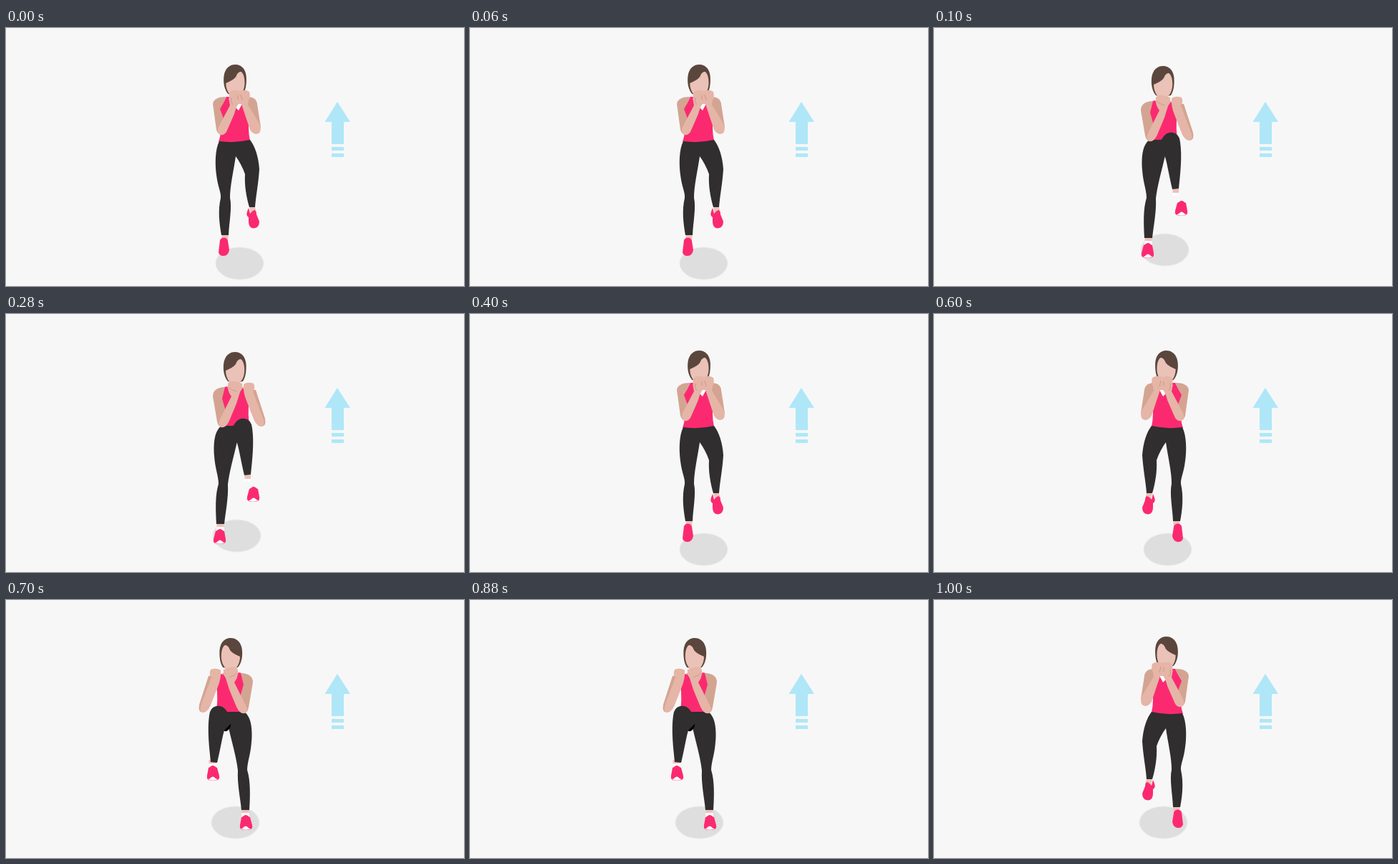
An HTML page for the animation above (1100 ms loop, 640x360 px).

```html
<!DOCTYPE html>
<html lang="en">
<head>
<meta charset="utf-8">
<title>High knees</title>
<style>
  html, body { margin: 0; width: 100%; height: 100%; overflow: hidden; background: #f7f7f7; }
  svg { display: block; width: 100%; height: 100%; }
  .pink { fill: #fb2a70; }
  .pants { fill: #302e2f; }
  .skin { fill: #e5b5a7; }
  .shade { fill: #d4a492; }
  .face { fill: #ebc2b7; }
  .hair { fill: #5b463d; }
  .white { fill: #fff; }
  .arrow { fill: #afe7f8; }
  .line { fill: none; stroke: #c99784; stroke-width: .9; }

  .pose, .shadow { animation: 1.1s step-end infinite; }
  .pose { opacity: 0; }
  .lift-r { animation-name: lift-r; }
  .knee-r { animation-name: knee-r; }
  .stand { animation-name: stand; }
  .lift-l { animation-name: lift-l; }
  .knee-l { animation-name: knee-l; }
  .shadow { fill: #dedede; animation-name: shadow; }

  @keyframes lift-r { 0%, 36.36% { opacity: 1 } 9.09%, 45.45%, 100% { opacity: 0 } }
  @keyframes knee-r { 0%, 36.36%, 100% { opacity: 0 } 9.09% { opacity: 1 } }
  @keyframes stand { 0%, 54.54%, 100% { opacity: 0 } 45.45% { opacity: 1 } }
  @keyframes lift-l { 0%, 63.63% { opacity: 0 } 54.54%, 90.9%, 100% { opacity: 1 } }
  @keyframes knee-l { 0%, 90.9%, 100% { opacity: 0 } 63.63% { opacity: 1 } }
  @keyframes shadow {
    0%, 36.36%, 54.54% { transform: translate(326.5px, 328.5px) }
    9.09%, 45.45% { transform: translate(322.5px, 309.5px) }
    63.63%, 100% { transform: translate(320.5px, 310.5px) }
  }
</style>
</head>
<body>
<svg viewBox="0 0 640 360">
  <defs>
    <g id="head">
      <path class="hair" d="M310 86C303 78 303 64 305 57C308 48 314 45 320 45C329 45 335 52 335.500 62C336 71 335 80 331 86L320 88Z"/>
      <path class="face" d="M307 71C313 68 318 66 321 62C323 57 325 55 328 55C332 57 334 66 333 74C332 84 326 90 320 90C313 90 307 82 307 71Z"/>
    </g>

    <path id="neck" class="shade" d="M313 80H327V91Q330 95 336 96L320 108L304 96Q311 95 313 91Z"/>

    <g id="shoe">
      <path class="face" d="M294.500 292H304.500V302H294.500Z"/>
      <path class="white" d="M294.500 297H304.500L305 303H294Z"/>
      <path class="pink" d="M293 303C295 303 296 300 299 300C302 300 303 303 305 303L307 314Q308 320 303 320.500H294Q289 320 290 314Z"/>
      <path class="white" d="M291 319Q295 319 296 317Q299 314 302 317Q303 319 306 319Q299 322 291 319Z"/>
    </g>

    <path id="leg" class="pants" d="M301 156C290 164 290 184 291 198C292 215 297 226 297 237C292 253 293 274 294 293H305C307 275 311 256 310 238C312 220 318 200 323 178L325 156Z"/>

    <g id="half">
      <use href="#shoe"/>
      <path class="pants" d="M302 151C291 160 289 180 291 196C292 213 297 225 297 236C292 252 293 274 294 293H305C307 275 311 256 310 238C311 220 317 200 320.500 182V151Z"/>
    </g>

    <g id="arm">
      <path class="skin" d="M304 94C294 95 289 98 288 105L285 138Q284 150 291 150Q296 150 299 146L314 120Q319 112 320 104V98Q317 96 314 99L301 124L299 112Q302 104 304 94Z"/>
      <path class="line" d="M301 124L298 132M314 99Q317 101 316 107"/>
    </g>

    <g id="lift">
      <path class="face" d="M301.500 287H311L310 297H302ZM340 249L347 247L350 257L342 260Z"/>
      <path class="pink" d="M299 296Q301 292 305 292.500Q309 293 310 297L312 310Q310 318 304 318Q298 318 297 313Z"/>
      <path class="pink" d="M339 251L341 259Q343 256 347 254Q350 255 350 260L354 270Q354 279 346 279.500Q339 279 339 270V264Q335 262 337 256Z"/>
      <path class="pink" d="M308 96H337L341 120Q337 140 341 157Q320 164 297 159Q302 145 300 125L298 112Q304 105 308 96Z"/>
      <path class="pants" d="M298 158C292 170 292 190 294 205C296 222 301 230 300 237C296 255 298 272 301 289H311C312 270 316 250 313 237C313 220 318 200 321 179C326 186 331 195 334 204C333 220 336 236 340 250H348C349 236 353 215 354 197C353 180 348 165 341 156Q320 161 298 158Z"/>
      <path class="shade" d="M308 96C297 96 290 99 289 106L294 142Q296 149 302 149L306 132L299 113Q304 105 308 96ZM337 96Q350 96 351 106L356 138L352 146L336 112Z"/>
      <path class="white" d="M311 99L316 107L320 110L325 115L331 104Z"/>
      <use href="#head" x=".3" y="6"/>
      <path class="skin" d="M313 89Q319 85 325 88Q335 85 340 89Q342 95 339 101L338 107L355 135Q358 147 350 148Q345 148 341 142L329 106H325Q321 111 319 120L308 145Q305 150 299 149Q294 146 297 138L313 108Q310 96 313 89Z"/>
      <path class="line" d="M324 94V100M328 93L330 101M315 97Q313 103 317 107"/>
    </g>

    <g id="trunk">
      <use href="#shoe"/>
      <use href="#neck" y="8"/>
      <path class="pink" d="M305 102L309 101L318 112L331 104L336 103L340 118Q337 140 341 160H298Q305 146 303 128L301 117Z"/>
      <path class="white" d="M309 102L319 115L329 104L320 110Z"/>
      <use href="#leg"/>
    </g>

    <path id="thigh" class="pants" d="M303 160Q316 161 321 151Q326 145 334 146Q343 148 344 159C347 180 344 205 342 224L333 225C329 208 326 190 323 180Z"/>

    <g id="near-arm">
      <path class="shade" d="M306 102C295 102 289 107 289 115L295 150Q297 159 303 158L308 139L302 118Z"/>
      <path class="skin" d="M310 97Q314 92 321 94L330 97Q331 104 327 109L322 125L312 149Q307 160 300 158Q295 155 299 147L315 115Q309 108 310 97Z"/>
      <path class="line" d="M311 102Q315 106 322 108"/>
    </g>

    <g id="far-arm">
      <path class="shade" d="M336 104L349 106L362 146Q364 157 357 157L340 126Z"/>
      <path class="skin" d="M332 98Q338 94 346 97Q349 103 345 108L360 148Q362 157 356 157Q351 156 347 149L336 121Q331 109 332 98Z"/>
    </g>
  </defs>

  <rect width="640" height="360" fill="#f7f7f7"/>
  <path class="arrow" d="M463 103L481 131H472V162H455V131H445.500ZM455 166H472V171H455ZM455 175H472V180H455Z"/>
  <ellipse class="shadow" rx="33.500" ry="22.500"/>

  <g class="pose lift-r"><use href="#lift"/></g>

  <g class="pose knee-r">
    <use href="#trunk"/>
    <path class="face" d="M333.500 224H342V230H333.500Z"/>
    <path class="white" d="M333.500 230H342V234H333.500Z"/>
    <path d="M321 162H325V178H322Z"/>
    <use href="#thigh"/>
    <svg x="336" y="241" width="22" height="24" viewBox="289 300 22 24"><use href="#shoe"/></svg>
    <use href="#far-arm"/>
    <use href="#head" y="8"/>
    <use href="#near-arm"/>
  </g>

  <g class="pose stand">
    <use href="#half"/>
    <use href="#half" transform="matrix(-1 0 0 1 642 0)"/>
    <use href="#neck"/>
    <path class="pink" d="M303 94L308 98L320 112L332 98L337 94L342 112Q336 134 340 154Q321 161 301 154Q306 134 298 112Z"/>
    <path class="white" d="M314 104H326L320 113Z"/>
    <use href="#head"/>
    <use href="#arm"/>
    <use href="#arm" transform="matrix(-1 0 0 1 640 0)"/>
    <path class="white" d="M315.500 107Q320 103 325 107L320 113Z"/>
  </g>

  <g class="pose lift-l"><use href="#lift" transform="matrix(-1 0 0 1 645 0)"/></g>

  <g class="pose knee-l">
    <g transform="matrix(-1 0 0 1 634 0)">
      <use href="#trunk"/>
      <path d="M319 162H331V182Q324 186 320 176Z"/>
      <use href="#shoe" x="46" y="-69"/>
      <use href="#thigh" x="6" y="2"/>
      <use href="#far-arm" x="2"/>
      <use href="#head" y="8"/>
      <use href="#near-arm"/>
    </g>
  </g>
</svg>
</body>
</html>
```
